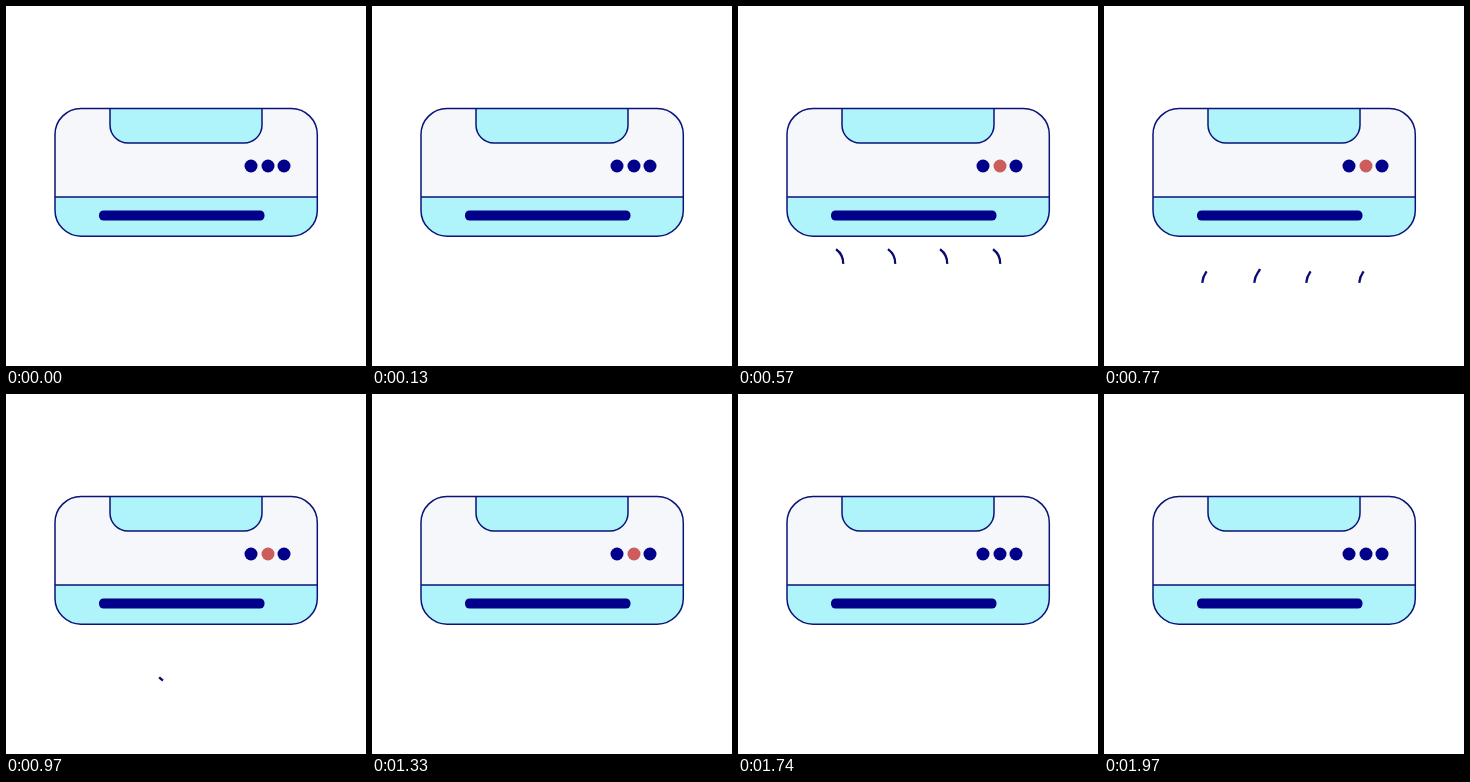
Animation, 360 px wide and 360 px high, one loop 2070 ms. Source, as an HTML page:

```html
<!DOCTYPE html>
<html lang="en">
<head>
<meta charset="utf-8">
<title>Air conditioner</title>
<style>
html, body { margin: 0; width: 100%; height: 100%; overflow: hidden; background: #fff; }
svg { display: block; width: 100%; height: 100%; }
</style>
</head>
<body>
<svg viewBox="0 0 360 360">
  <defs>
    <clipPath id="body"><rect x="49" y="102.5" width="262.3" height="127.7" rx="26"/></clipPath>
  </defs>
  <g clip-path="url(#body)">
    <path fill="#f6f7fb" d="M49 102h263v89H49z"/>
    <path fill="#b0f4fb" d="M49 191h263v40H49z"/>
  </g>
  <g fill="none" stroke="#0a1478" stroke-width="1.5">
    <path fill="#b0f4fb" d="M104 102.5V119a18 18 0 0 0 18 18H238a18 18 0 0 0 18-18V102.5"/>
    <path d="M49 191H311.3"/>
    <rect x="49" y="102.5" width="262.3" height="127.7" rx="26"/>
  </g>
  <g fill="#00008b">
    <rect x="93" y="204.5" width="165.5" height="10" rx="4.5"/>
    <circle cx="245" cy="160" r="6.5"/>
    <circle id="lamp" cx="262" cy="160" r="6.5"/>
    <circle cx="278" cy="160" r="6.5"/>
  </g>
  <g id="air" fill="none" stroke="#0a0a70" stroke-width="2.3"></g>
</svg>
<script>
const LOOP = 2070, LAMP_ON = 370, LAMP_OFF = 1500;
const lamp = document.getElementById('lamp');
const air = document.getElementById('air');

// Each draft is a wavy line, drawn and then erased from its top.
const drafts = [97, 149, 201, 254].map((x, i) => {
  const path = document.createElementNS('http://www.w3.org/2000/svg', 'path');
  path.setAttribute('d', `M${x} 242.5c6 4 9 10 8 17c-1 7-6 8-6.500 16c0 5 2 8 6.500 11`);
  path.setAttribute('pathLength', 100);
  air.append(path);
  return { path, end: i === 1 ? 1015 : 965 };
});

const progress = (t, from, to) => 100 * Math.min(1, Math.max(0, (t - from) / (to - from)));

function draw(now) {
  const t = now % LOOP;
  lamp.setAttribute('fill', t >= LAMP_ON && t < LAMP_OFF ? '#cd5c5c' : '#00008b');
  for (const { path, end } of drafts) {
    const head = progress(t, 390, 890);
    const tail = progress(t, 560, end);
    path.style.display = head > tail ? '' : 'none';
    path.setAttribute('stroke-dasharray', `${head - tail} 200`);
    path.setAttribute('stroke-dashoffset', -tail);
  }
}

let start;
function tick(now) {
  start ??= now;
  draw(now - start);
  requestAnimationFrame(tick);
}
draw(0);
requestAnimationFrame(tick);
</script>
</body>
</html>
```
